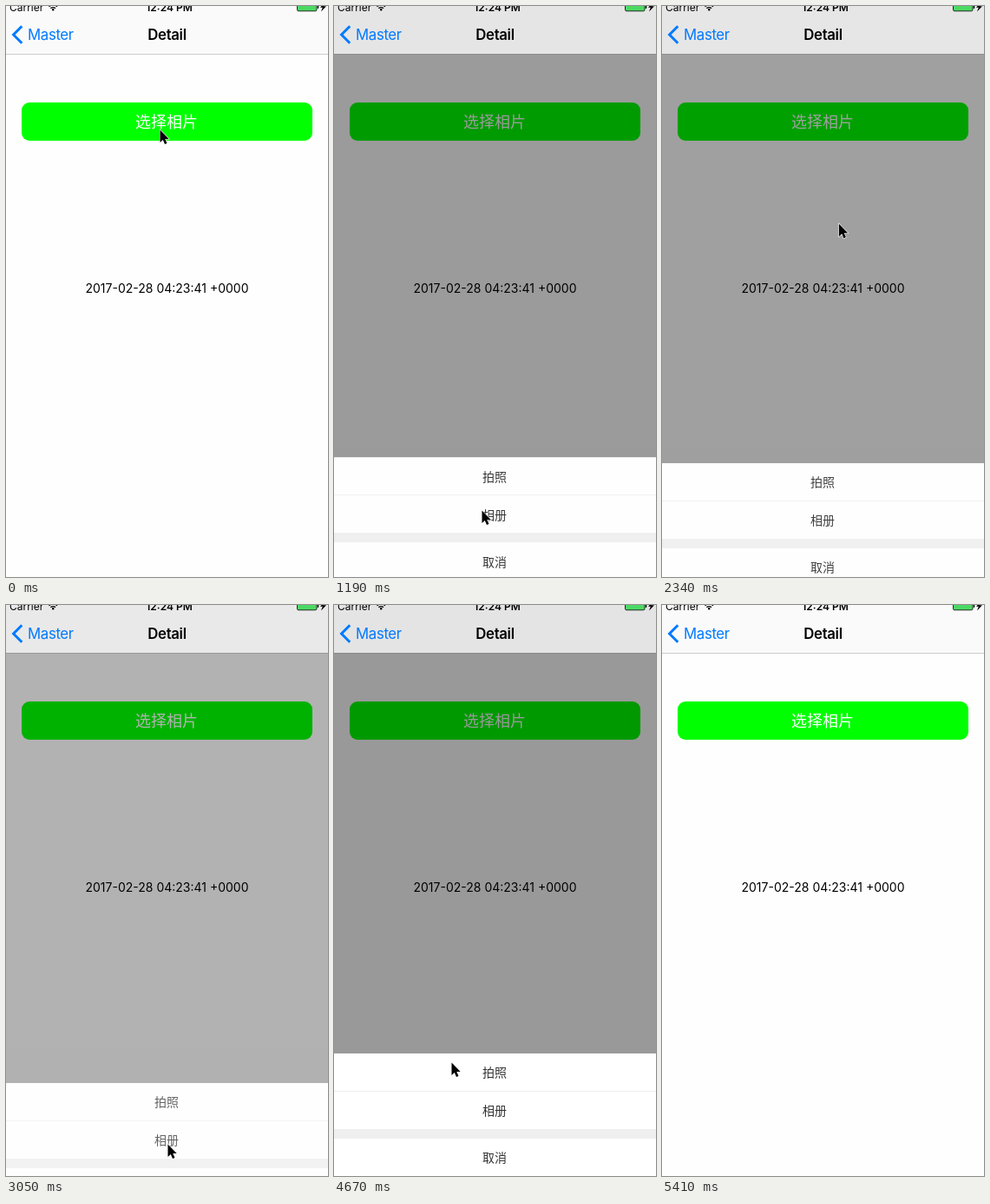
Write an HTML page that moves like this. It is 371 by 657 pixels and loops after 6450 ms.

```html
<!DOCTYPE html>
<html lang="zh">
<head>
<meta charset="utf-8">
<title>Detail</title>
<style>
  html, body { margin: 0; width: 100%; height: 100%; overflow: hidden; background: #fefefe; }
  svg { display: block; width: 371px; height: 657px; font-family: Inter, "Noto Sans CJK SC", "Noto Sans CJK", sans-serif; }
  .mid { text-anchor: middle; }
  .bar { font-size: 16.8px; letter-spacing: -.35px; }
  .status { font-size: 12px; }
  .cjk { font-family: "Noto Sans CJK SC", "Noto Sans CJK", sans-serif; text-anchor: middle; }
  #sheet text { font-size: 14px; fill: #333; }
</style>
</head>
<body>
<svg viewBox="0 0 371 657">
  <rect width="371" height="657" fill="#fefefe"/>
  <rect x="18" y="111" width="335" height="44" rx="9" fill="#0f0"/>
  <text class="cjk" x="185" y="139.8" font-size="18" font-weight="300" fill="#fff">选择相片</text>
  <text class="mid" x="185.5" y="329.5" font-size="14">2017-02-28 04:23:41 +0000</text>

  <g id="overlay">
    <rect width="371" height="657" fill="#000" fill-opacity=".4"/>
    <g id="sheet">
      <rect width="371" height="142" fill="#fff"/>
      <rect id="row" width="371" height="43.5" fill="#e6e6e6"/>
      <rect y="43" width="371" height="1" fill="#efefef"/>
      <rect y="87" width="371" height="11" fill="#efefef"/>
      <text class="cjk" x="185" y="27.3">拍照</text>
      <text class="cjk" x="185" y="71.3">相册</text>
      <text class="cjk" x="185" y="125.3">取消</text>
    </g>
  </g>

  <rect id="nav" width="371" height="55"/>
  <rect id="line" y="55" width="371" height="1"/>
  <path d="M18.3 23.3 8.6 33l9.7 9.7" fill="none" stroke="#007aff" stroke-width="3"/>
  <text class="bar" x="25" y="39" fill="#007aff">Master</text>
  <text class="bar mid" x="185.5" y="39" font-weight="600">Detail</text>
  <text class="status" x="4" y="5.6">Carrier</text>
  <path d="M49.5 0.6Q54.2-3 59 .6M51.4 2.6Q54.2.6 57 2.6" fill="none" stroke="#000" stroke-width="1.4"/>
  <circle cx="54.2" cy="4.3" r="1.2"/>
  <text class="status mid" x="188" y="5.6" font-weight="600">12:24 PM</text>
  <rect x="335.5" y="-4" width="22.5" height="9.8" rx="1.5" fill="#4cd964" stroke="#000" stroke-width=".8"/>
  <rect x="358.8" y="-1" width="1.4" height="4" rx=".7"/>
  <path d="M367-4 362 1.8h2.8L363 6.5 369 .2h-3z"/>

  <path id="cursor" d="M.5.5V15L3.8 11.9 6 17l2.5-1.1-2.2-4.9h4.4Z" stroke="#fff" stroke-width="1.1" paint-order="stroke"/>
</svg>
<script>
const LOOP = 6450, FADE = 300;
const $ = id => document.getElementById(id);
const ease = t => (t = Math.min(1, Math.max(0, t)), t * t * (3 - 2 * t));
const gray = v => `rgb(${v},${v},${v})`;

// [open start, close start] of each visit to the sheet
const visits = [[110, 1164], [2090, 2955], [3960, 4875]];

// [time, x, y] of the pointer tip
const path = [
  [0, 177, 142], [250, 177, 142], [1000, 170, 580], [1250, 170, 580],
  [1830, 209, 132], [2200, 209, 132], [2640, 186, 620], [3050, 186, 620],
  [3460, 149, 88], [3550, 149, 88], [3700, 152, 137], [4060, 152, 137],
  [4520, 135, 540], [4600, 135, 540], [4670, 135, 526], [4920, 135, 526],
  [5390, 104, 680], [LOOP, 104, 680]
];

function pointer(t) {
  const i = path.findIndex(k => k[0] > t);
  const [t0, x0, y0] = path[i - 1], [t1, x1, y1] = path[i];
  const k = ease((t - t0) / (t1 - t0));
  return [x0 + (x1 - x0) * k, y0 + (y1 - y0) * k];
}

function draw(now) {
  const t = now % LOOP;
  const open = visits.reduce((p, [a, b]) => p + ease((t - a) / FADE) - ease((t - b) / FADE), 0);
  $('overlay').setAttribute('opacity', open);
  $('sheet').setAttribute('transform', `translate(0 ${657 - 141 * open})`);
  $('row').setAttribute('visibility', t >= 4720 && t < 4870 ? 'visible' : 'hidden');
  $('nav').setAttribute('fill', gray(250 - 22 * open));
  $('line').setAttribute('fill', gray(204 - 66 * open));
  $('cursor').setAttribute('transform', `translate(${pointer(t)})`);
}

const start = performance.now();
function frame() {
  draw(performance.now() - start);
  requestAnimationFrame(frame);
}
frame();
</script>
</body>
</html>
```
